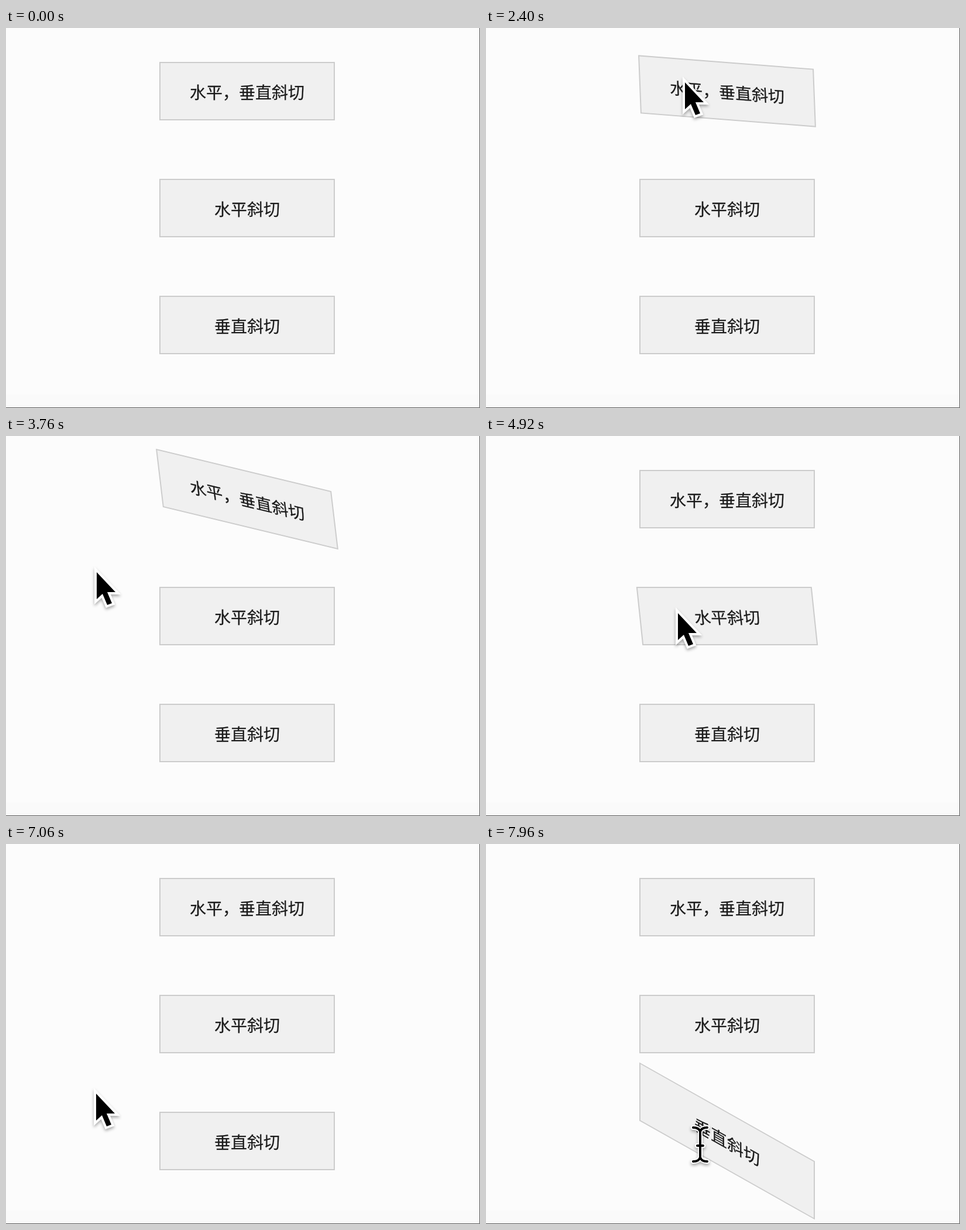
An HTML page for the animation above (8000 ms loop, 810 by 650 pixels).

```html
<!DOCTYPE html>
<html lang="zh-CN">
<head>
<meta charset="utf-8">
<title>斜切</title>
<style>
  html, body { margin: 0; width: 100%; height: 100%; overflow: hidden; background: #fcfcfc; }
  svg { display: block; width: 810px; height: 650px; }
  .button rect { fill: #f0f0f0; stroke: #ccc; stroke-width: 2; }
  .button text {
    font: 28px "Noto Sans CJK SC", "Noto Sans CJK", sans-serif;
    fill: #1c1c1c;
    stroke: #1c1c1c;
    stroke-width: .25;
    text-anchor: middle;
  }
  #arrow, #beam { filter: drop-shadow(0 3px 2.5px rgba(0, 0, 0, .33)); }
  #beam { fill: none; stroke-linecap: round; }
</style>
</head>
<body>
<svg viewBox="0 0 810 650">
  <defs>
    <path id="beamShape" d="M-12-29Q-2-29 0-22Q2-29 12-29M0-22V22M-12 29Q-2 29 0 22Q2 29 12 29M-5 2H5"/>
  </defs>
  <rect width="810" height="650" fill="#fcfcfc"/>
  <rect y="627" width="809" height="22" fill="#fafafa"/>
  <g id="buttons"></g>
  <path d="M809.5 0V649.5H0" fill="none" stroke="#555"/>
  <path id="arrow" d="M1 1V47L11 38L19 57L27 54L19 35H33Z"
        stroke="#fff" stroke-width="8" stroke-miterlimit="6" paint-order="stroke"/>
  <g id="beam">
    <use href="#beamShape" stroke="#fff" stroke-width="8"/>
    <use href="#beamShape" stroke="#000" stroke-width="4"/>
  </g>
</svg>
<script>
const LOOP = 8000, FADE = 500, TEXT_LEFT = 355;
const $ = id => document.getElementById(id);

// Skew angles in degrees; enter and leave are hover times in ms.
const buttons = [
  { label: '水平，垂直斜切', ax: 10, ay: 20, enter: 2317, leave: 3655 },
  { label: '水平斜切', ax: 70, ay: 0, enter: 4874, leave: 6195 },
  { label: '垂直斜切', ax: 0, ay: 30, enter: 7550, leave: Infinity },
];

// Pointer trips between rests: key points of time, x, y.
const trips = [
  [[980, -36, 262], [1310, 82, 228]],
  [[1710, 82, 228], [1750, 105, 201], [2220, 178, 113], [2400, 338, 92], [2520, 368, 98]],
  [[3400, 368, 98], [3640, 308, 118], [3760, 155, 231], [3900, 147, 250]],
  [[4500, 147, 250], [4760, 190, 272], [4920, 326, 302], [5060, 372, 306]],
  [[6040, 372, 306], [6500, 153, 421]],
  [[7020, 153, 421], [7060, 153, 426], [7460, 206, 500], [7720, 366, 514]],
];

// CSS "ease": cubic-bezier(.25, .1, .25, 1)
function ease(x) {
  if (x <= 0) return 0;
  if (x >= 1) return 1;
  let lo = 0, hi = 1, s;
  for (let i = 0; i < 24; i++) {
    s = (lo + hi) / 2;
    if (.75 * s * (1 - s) + s ** 3 < x) lo = s; else hi = s;
  }
  return .3 * s * (1 - s) ** 2 + 3 * (1 - s) * s * s + s ** 3;
}

// Smooth curve through a trip's points, at rest at both ends.
function along(points, t) {
  const last = points.length - 1;
  const i = points.findIndex(p => p[0] > t) - 1;
  if (i < 0) return points[last].slice(1);
  const a = points[i], b = points[i + 1], span = b[0] - a[0], s = (t - a[0]) / span;
  const speed = (k, axis) => k === 0 || k === last ? 0 :
    (points[k + 1][axis] - points[k - 1][axis]) / (points[k + 1][0] - points[k - 1][0]);
  return [1, 2].map(axis =>
    a[axis] + (b[axis] - a[axis]) * s * s * (3 - 2 * s) +
    span * s * (1 - s) * (speed(i, axis) * (1 - s) - speed(i + 1, axis) * s));
}

$('buttons').innerHTML = buttons.map(b => `<g class="button">
  <rect x="-149" y="-49" width="298" height="98"/><text y="12.5">${b.label}</text></g>`).join('');
const groups = [...$('buttons').children];
const slope = degrees => Math.tan(degrees * Math.PI / 180);

function show(el, on, [x, y]) {
  el.style.display = on ? '' : 'none';
  el.setAttribute('transform', `translate(${Math.round(x)} ${Math.round(y)})`);
}

function draw(t) {
  buttons.forEach((b, i) => {
    const p = ease((t - b.enter) / FADE) - ease((t - b.leave) / FADE);
    groups[i].setAttribute('transform',
      `matrix(1 ${slope(b.ay * p)} ${slope(b.ax * p)} 1 412 ${108 + 200 * i})`);
  });
  const trip = trips.filter(points => points[0][0] <= t).pop();
  const pos = trip ? along(trip, t) : [0, 0];
  const onText = pos[0] > TEXT_LEFT;
  show($('arrow'), trip && !onText, pos);
  show($('beam'), onText, pos);
}

const start = performance.now();
function tick() {
  draw((performance.now() - start) % LOOP);
  requestAnimationFrame(tick);
}
tick();
</script>
</body>
</html>
```
